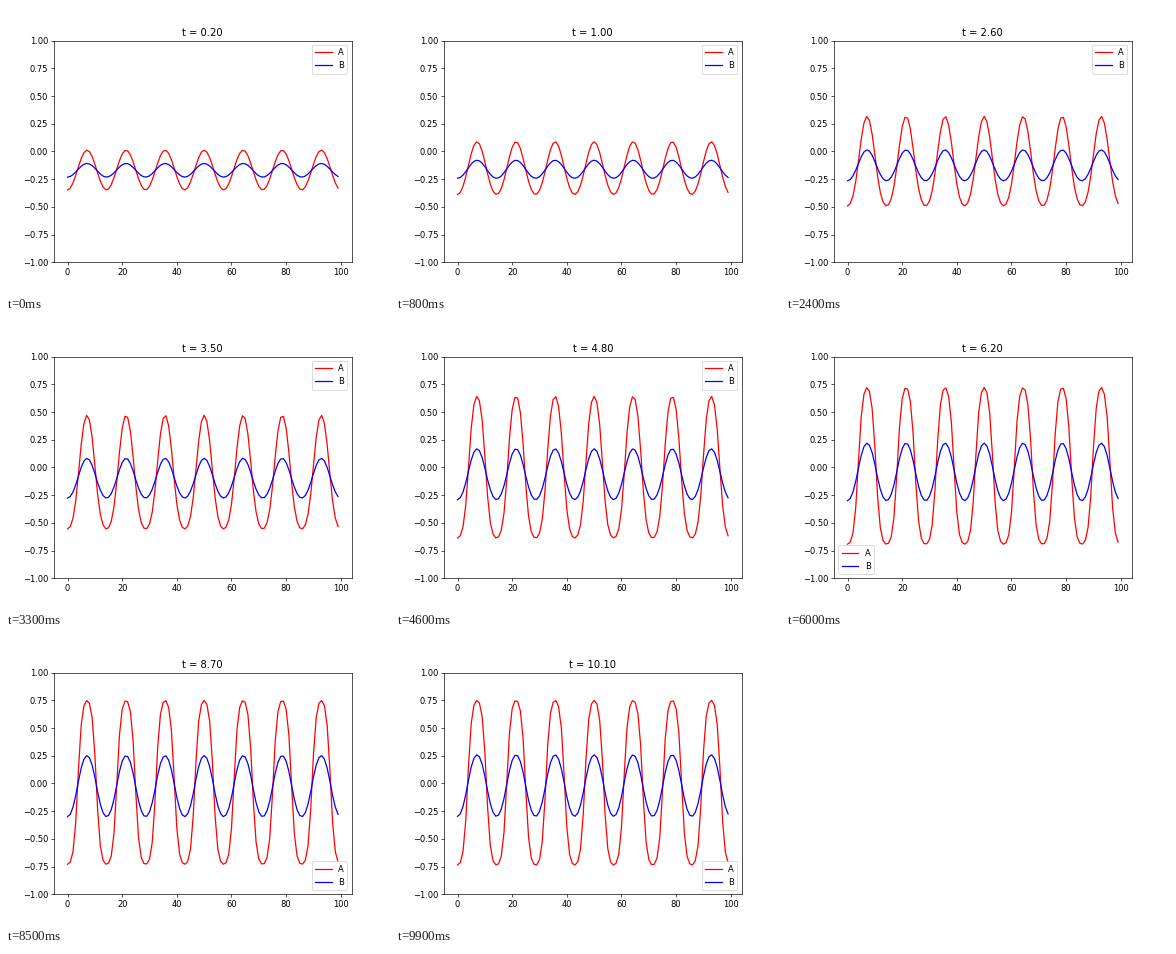
Write a matplotlib script that moves like this. It is 384 px wide and 288 px high and loops after 10 s.

```python
import numpy as np
import matplotlib.pyplot as plt
from matplotlib.animation import FuncAnimation

# Two-species reaction-diffusion system on a periodic line
DA, DB, ALPHA, BETA = 1, 100, -0.005, 10
WIDTH, DT, STEPS = 100, 0.001, 100
FRAMES, INTERVAL = 100, 100
MODE = 7


def laplacian(u):
    return np.roll(u, 1) + np.roll(u, -1) - 2 * u


def advance(a, b):
    for _ in range(STEPS):
        da = DA * laplacian(a) + a - a**3 - b + ALPHA
        db = DB * laplacian(b) + BETA * (a - b)
        a, b = a + DT * da, b + DT * db
    return a, b


def simulate():
    steady = np.cbrt(ALPHA)
    wave = np.cos(2 * np.pi * MODE * np.arange(WIDTH) / WIDTH)
    a = b = steady * (1 + wave)
    states = []
    for _ in range(FRAMES + 2):
        states.append((a, b))
        a, b = advance(a, b)
    return states


states = simulate()
fig, ax = plt.subplots(figsize=(6.4, 4.8), dpi=60)


def draw(i):
    step = i + 2
    a, b = states[step]
    ax.clear()
    ax.plot(a, color="r", label="A")
    ax.plot(b, color="b", label="B")
    ax.legend()
    ax.set_ylim(-1, 1)
    ax.set_title(f"t = {step * STEPS * DT:.2f}")


anim = FuncAnimation(fig, draw, frames=FRAMES, init_func=lambda: None,
                     interval=INTERVAL, repeat=True)
plt.show()
```
